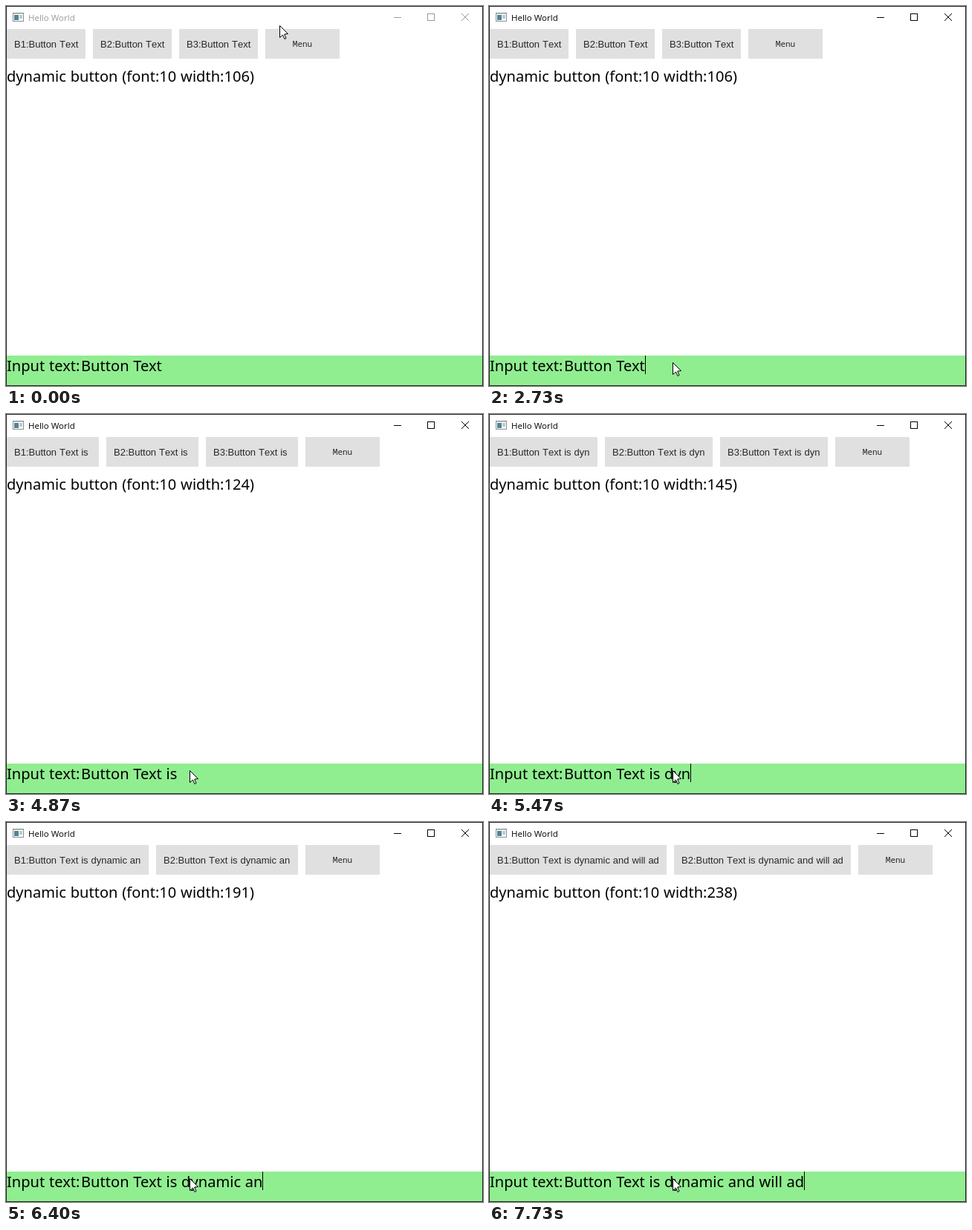
These frames come from a looping animation (642 by 512 pixels, 8000 ms). An HTML page with a canvas:

```html
<!DOCTYPE html>
<html lang="en">
<head>
<meta charset="utf-8">
<title>Hello World</title>
<style>
  html, body { margin: 0; width: 100%; height: 100%; overflow: hidden; }
  canvas { display: block; }
</style>
</head>
<body>
<canvas id="stage" width="642" height="512"></canvas>
<script>
const ctx = document.getElementById('stage').getContext('2d', { alpha: false });

const LOOP = 8000, STEP = 200 / 3, FOCUS = 2730, BLINK = 530;
const LABEL_FONT = '20.1px "Noto Sans", sans-serif';
const BUTTON_FONT = '13px "Liberation Sans", sans-serif';
const MENU_FONT = '11px "Noto Sans Mono", monospace';
const TITLE_FONT = '11.5px "Open Sans", sans-serif';
const INK = '#26282a';

const START_TEXT = 'Button Text';
const TYPED = ' is dynamic and will ad';
const KEY_TIMES = [3400, 4130, 4270, 4330, 5070, 5200, 5470, 5600, 5800, 5930, 6000, 6130,
  6270, 6400, 6530, 6600, 6730, 6800, 7000, 7130, 7270, 7530, 7730];
const ADVANCE = { ' ': 4, i: 3, l: 3, m: 11, w: 9 };

// Pointer stops: step number, x, y
const POINTER = [[2, 368, 26], [15, 96, 442], [18, 120, 471], [24, 77, 100],
  [26, 83, 68], [28, 83, 68], [38, 247, 480]];

function rect(x, y, w, h, color) {
  ctx.fillStyle = color;
  ctx.fillRect(x, y, w, h);
}

function text(string, x, y, font, color, { align = 'left', kerning = 'normal', space = 0 } = {}) {
  ctx.font = font;
  ctx.textAlign = align;
  ctx.fontKerning = kerning;
  ctx.wordSpacing = space + 'px';
  ctx.fillStyle = color;
  ctx.fillText(string, x, y);
}

function pointerAt(time) {
  const step = Math.floor((time + 5) / STEP);
  const next = POINTER.findIndex(stop => stop[0] > step);
  if (next === 0) return POINTER[0].slice(1);
  if (next < 0) return POINTER[POINTER.length - 1].slice(1);
  const [s0, x0, y0] = POINTER[next - 1], [s1, x1, y1] = POINTER[next];
  const u = (step - s0) / (s1 - s0), ease = u * u * (3 - 2 * u);
  return [Math.round(x0 + (x1 - x0) * ease), Math.round(y0 + (y1 - y0) * ease)];
}

function drawTitleBar(active) {
  const color = active ? '#000' : '#999';
  rect(9, 9, 15, 12, '#8a9096');
  rect(10, 10, 13, 10, '#fff');
  rect(10, 10, 13, 1, '#c8ccd0');
  rect(11, 12, 6, 7, '#4f8593');
  rect(18, 12, 4, 5, '#c4c8cc');
  text('Hello World', 30, 20, TITLE_FONT, color);

  rect(522, 15, 10, 1, color);
  ctx.strokeStyle = color;
  ctx.lineWidth = 1;
  ctx.strokeRect(567.5, 10.5, 9, 9);
  ctx.beginPath();
  ctx.moveTo(613, 10); ctx.lineTo(623, 20);
  ctx.moveTo(623, 10); ctx.lineTo(613, 20);
  ctx.stroke();
}

function drawButtons(caption, width) {
  const count = width < 175 ? 3 : 2;
  let x = 1;
  for (let i = 1; i <= count; i++, x += width + 10) {
    rect(x, 31, width, 40, '#e0e0e0');
    text(`B${i}:${caption}`, x + 10, 56, BUTTON_FONT, INK, { kerning: 'none', space: 0.3 });
  }
  rect(x, 31, 100, 40, '#e0e0e0');
  text('Menu', x + 50, 55, MENU_FONT, INK, { align: 'center' });
}

function drawInput(value, caretOn) {
  rect(1, 471, 640, 40, '#90ee90');
  text('Input text:', 1, 492, LABEL_FONT, '#000', { space: 0.5 });
  text(value, 101, 492, LABEL_FONT, '#000', { space: 0.5 });
  if (caretOn) rect(101 + Math.round(ctx.measureText(value).width), 471, 1, 25, '#000');
}

function drawPointer(x, y) {
  ctx.save();
  ctx.translate(x + 0.5, y + 0.5);
  ctx.beginPath();
  for (const [px, py] of [[0, 0], [0, 16], [4, 12.5], [6.5, 18], [8.5, 17], [6.2, 11.5], [11, 11]]) {
    ctx.lineTo(px, py);
  }
  ctx.closePath();
  ctx.fillStyle = '#fff';
  ctx.fill();
  ctx.strokeStyle = '#000';
  ctx.lineWidth = 1;
  ctx.stroke();
  ctx.restore();
}

function draw(time) {
  const keys = KEY_TIMES.filter(t => t <= time);
  const typed = TYPED.slice(0, keys.length);
  const width = [...typed].reduce((sum, c) => sum + (ADVANCE[c] || 7), 106);
  const active = time >= FOCUS;
  const lastAction = keys.length ? keys[keys.length - 1] : FOCUS;
  const caretOn = active && Math.floor((time - lastAction) / BLINK) % 2 === 0;

  rect(0, 0, 642, 512, '#fff');
  drawTitleBar(active);
  drawButtons(START_TEXT + typed, width);
  text(`dynamic button (font:10 width:${width})`, 1, 102, LABEL_FONT, '#000', { space: 0.5 });
  drawInput(START_TEXT + typed, caretOn);
  ctx.strokeStyle = '#222';
  ctx.lineWidth = 1;
  ctx.strokeRect(0.5, 0.5, 641, 511);
  drawPointer(...pointerAt(time));
}

const begin = performance.now();
function frame() {
  draw((performance.now() - begin) % LOOP);
  requestAnimationFrame(frame);
}
frame();
</script>
</body>
</html>
```
